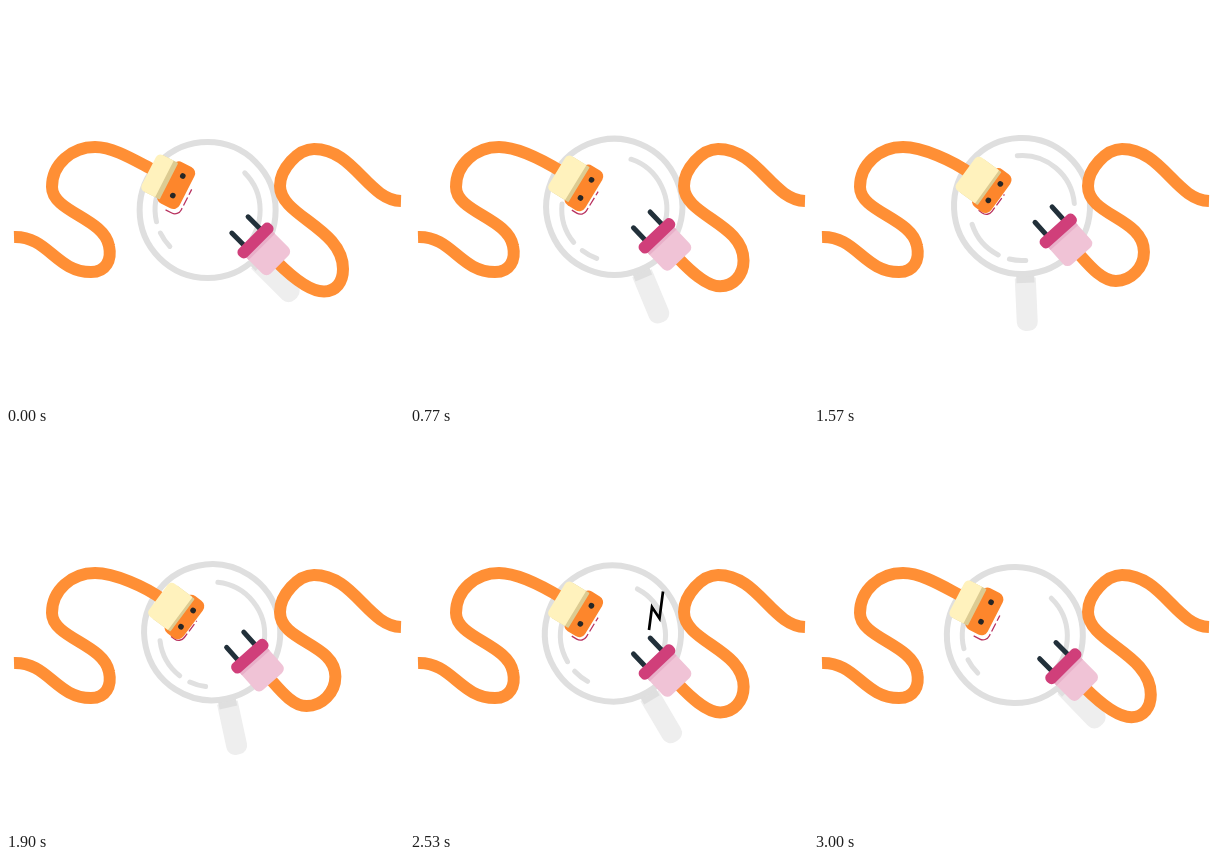
Recreate the animation shown at these times as an HTML page with a canvas. Size 398 by 398 pixels, loop 3030 ms.

```html
<!DOCTYPE html>
<html lang="en">
<head>
<meta charset="utf-8">
<title>Plug and socket</title>
<style>
html, body { margin: 0; width: 100%; height: 100%; overflow: hidden; background: #fff; }
canvas { display: block; width: 398px; height: 398px; }
</style>
</head>
<body>
<canvas id="stage"></canvas>
<script>
const SIZE = 398, LOOP = 3030, RAD = Math.PI / 180;
const ORANGE = '#ff8f35', GREY = '#dfdfdf', PALE = '#eeeeee', DARK = '#22303a';
const canvas = document.getElementById('stage');
const ctx = canvas.getContext('2d');
const ratio = window.devicePixelRatio || 1;
canvas.width = canvas.height = Math.round(SIZE * ratio);

// Spark windows: [from, to, points]
const bolt = (x, y) => [[x, y], [x - 3.5, y + 27], [x - 11, y + 15.5], [x - 14, y + 38.5]];
const sparks = [
  [1000, 1260, bolt(243, 149.5)],
  [1030, 1230, [[188, 219], [200, 213], [195, 221], [204, 217], [200, 225]]],
  [2410, 2650, bolt(253, 159.5)]
];

function local(x, y, deg, draw) {
  ctx.save();
  ctx.translate(x, y);
  ctx.rotate(deg * RAD);
  draw();
  ctx.restore();
}

function box(x0, y0, x1, y1, radii, color) {
  ctx.fillStyle = color;
  ctx.beginPath();
  ctx.roundRect(x0, y0, x1 - x0, y1 - y0, radii);
  ctx.fill();
}

function dot(x, y, r, color) {
  ctx.fillStyle = color;
  ctx.beginPath();
  ctx.arc(x, y, r, 0, 2 * Math.PI);
  ctx.fill();
}

function pen(color, width, cap = 'butt') {
  ctx.strokeStyle = color;
  ctx.lineWidth = width;
  ctx.lineCap = cap;
  ctx.lineJoin = 'miter';
}

function arc(r, from, to) {
  ctx.beginPath();
  ctx.arc(0, 0, r, from * RAD, to * RAD);
  ctx.stroke();
}

// Point at (u, v) in a frame turned by deg around (x, y)
function place(x, y, deg, u, v) {
  const c = Math.cos(deg * RAD), s = Math.sin(deg * RAD);
  return [x + u * c - v * s, y + u * s + v * c];
}

function lens(p, t) {
  const turn = 45 + 44 * p;
  const nudge = 0.9 * Math.max(0, 1 - t / 400);
  const [x, y] = place(208.5 + nudge, 211 + nudge, turn, -11, 0);
  local(x, y, turn, () => {
    box(72, -10.5, 125, 10.5, [0, 9, 9, 0], PALE);
    box(67, -9, 77, 9, 0, GREY);
    pen(GREY, 6);
    arc(68, 0, 360);
  });
  // The glints turn against the handle
  local(x, 204 - 2 * p, -52 * p, () => {
    pen('#e0e0e0', 5, 'round');
    arc(52.5, -45, 45);
    arc(52.5, 167, 212);
    arc(52.5, 136, 154);
  });
}

function socket(p) {
  const x = 171.8 + 8.5 * p, y = 179.8 + 6.3 * p, turn = 27 + 9 * p;
  const end = place(x, y, turn, -27 - 3 * p, -3 + 2 * p);
  const pull = place(...end, turn, -22, 0);
  pen(ORANGE, 12);
  ctx.beginPath();
  ctx.moveTo(8, 231);
  ctx.bezierCurveTo(42, 230, 50, 266, 85, 266);
  ctx.bezierCurveTo(100, 266, 106, 254, 103, 240);
  ctx.bezierCurveTo(98, 212, 46, 206, 46, 181);
  ctx.bezierCurveTo(46, 158, 66, 141, 89, 141);
  ctx.bezierCurveTo(108, 141, ...pull, ...end);
  ctx.stroke();

  local(x, y, turn, () => {
    const front = 14 - 4.5 * p, low = 27 - 3 * p;
    pen('#b8325f', 1.3);
    ctx.setLineDash([20, 3, 9, 3, 6, 99]);
    ctx.beginPath();
    ctx.moveTo(-2 * p, low);
    ctx.arcTo(front, low, front, 0, 7);
    ctx.lineTo(front, -4);
    ctx.stroke();
    ctx.setLineDash([]);

    const lip = -10 + 4 * p;
    box(-14, -23, 10.5 - 2.5 * p, 23.5, 7, '#fd862c');
    box(-28, -20.5, lip, 20.5, 1, '#dccb92');
    box(-32.5 - 3 * p, -20.5, lip - 5 + 2 * p, 20.5, [5, 1, 1, 5], '#fff2bd');
    const gap = 11 - 0.8 * p;
    dot(0, -gap, 2.8, '#262626');
    dot(0, gap, 2.8, '#262626');
  });
}

function plug(p) {
  const x = 249.5 - 5.2 * p, y = 234.5 - 9.5 * p, turn = 225 + 3 * p;
  const end = place(x, y, turn, -30, 0);
  const pull = place(x, y, turn, -50 + 4 * p, 0);
  const right = 337 - 7 * p, side = 263 - 17 * p;
  const low = 285.5 - 10.5 * p, mid = 318 - 16 * p;
  pen(ORANGE, 12);
  ctx.beginPath();
  ctx.moveTo(395, 195);
  ctx.bezierCurveTo(362, 194, 348, 143, 308, 143);
  ctx.bezierCurveTo(292, 143, 274, 163, 274, 180);
  ctx.bezierCurveTo(274, 210, right, 222 - 10 * p, right, side);
  ctx.bezierCurveTo(right, side + 13 + 3 * p, mid + 12 + 3 * p, low, mid, low);
  ctx.bezierCurveTo(mid - 14, low, ...pull, ...end);
  ctx.stroke();

  local(x, y, turn, () => {
    pen(DARK, 5, 'round');
    for (const v of [-11.5, 11.5]) {
      ctx.beginPath();
      ctx.moveTo(3, v);
      ctx.lineTo(22, v);
      ctx.stroke();
    }
    box(-34, -18.5, -4, 18.5, [6, 0, 0, 6], '#f0c3d6');
    box(-9, -18.5, -4, 18.5, 0, '#e8b0c9');
    box(-6, -22.5, 6, 22.5, 5, '#d03f7a');
  });
}

function draw(now) {
  const t = now % LOOP;
  const swing = 1 - Math.abs(2 * t / LOOP - 1);
  // Plug and socket approach slowly and part faster
  const reach = Math.min(t / 1560, (LOOP - t) / 1040);
  ctx.setTransform(ratio, 0, 0, ratio, 0, 0);
  ctx.fillStyle = '#fff';
  ctx.fillRect(0, 0, SIZE, SIZE);
  lens(swing, t);
  socket(reach);
  plug(reach);
  pen('#000', 2.7);
  for (const [from, to, points] of sparks) {
    if (t < from || t >= to) continue;
    ctx.beginPath();
    points.forEach(q => ctx.lineTo(...q));
    ctx.stroke();
  }
}

let start;
function tick(now) {
  if (start === undefined) start = now;
  draw(now - start);
  requestAnimationFrame(tick);
}
draw(0);
requestAnimationFrame(tick);
</script>
</body>
</html>
```
